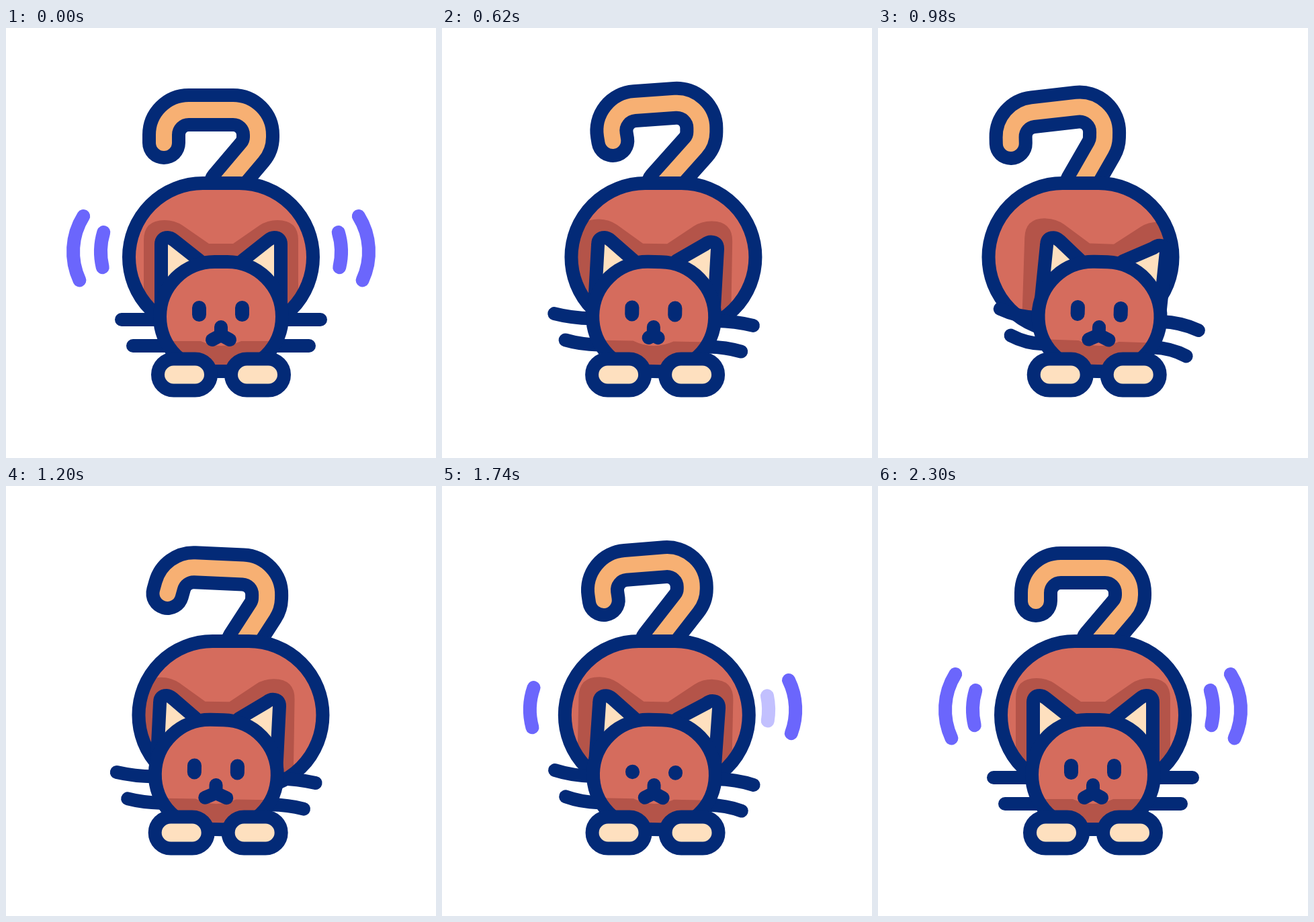
An HTML page with a canvas for the animation above (2.5 s loop, 640 px wide and 640 px high).

```html
<!DOCTYPE html>
<html lang="en">
<head>
<meta charset="utf-8">
<title>Wiggling cat</title>
<style>
  html, body { margin: 0; height: 100%; overflow: hidden; background: #fff; }
  canvas { display: block; width: 100vw; height: 100vh; }
</style>
</head>
<body>
<canvas id="stage" width="640" height="640"></canvas>
<script>
const ctx = document.getElementById('stage').getContext('2d');
const NAVY = '#032a77', RED = '#d56c5d', SHADE = '#b45449',
      ORANGE = '#f7b073', CREAM = '#fee0bf', VIOLET = '#6b66fc';
const LOOP = 2500, START = 165, END = 2300;

const clamp = (v, lo = 0, hi = 1) => Math.min(hi, Math.max(lo, v));
const sinDeg = a => Math.sin(a * Math.PI / 180);

// Smooth curve through [time, value] keys, at rest at both ends.
function spline(keys, t) {
  const n = keys.length - 1;
  t = clamp(t, keys[0][0], keys[n][0]);
  let i = 0;
  while (i < n - 1 && t > keys[i + 1][0]) i++;
  const slope = k => k < 1 || k >= n ? 0
    : (keys[k + 1][1] - keys[k - 1][1]) / (keys[k + 1][0] - keys[k - 1][0]);
  const [t0, a] = keys[i], [t1, b] = keys[i + 1];
  const d = t1 - t0, u = (t - t0) / d, v = 1 - u;
  return v * v * (1 + 2 * u) * a + u * u * (3 - 2 * u) * b
       + d * u * v * (v * slope(i) - u * slope(i + 1));
}

// Swing phase in degrees; the head runs slightly ahead near the end.
const phase = late => [[START, 180], [340, 217], [620, 390], [980, 630],
                       [1440, 918], [1740, late], [END, 1260]];
const BODY_PHASE = phase(1079), HEAD_PHASE = phase(1105);
const LEAN = [[START, 0], [340, 3], [480, 11], [620, 9], [800, -12], [980, 16],
              [1200, 8], [1440, -14], [1740, 11], [1980, -8], [END, 0]];
const MOUTH = [[START, 13], [340, 10.5], [620, 7], [980, 15], [1440, 15.5], [1740, 13.5], [END, 13]];

// Tail: tip, three bends and root, with offsets for each pose.
const TAIL = [235, 171, 235, 122, 375, 122, 375, 175, 326, 233];
const TAIL_POSES = [
  [START, Array(10).fill(0)],
  [340, [-3, 4, -5, 3, -5, -3, -3, -3, -1, 0]],
  [620, [8, -3, 0, -3, 0, -13, 0, -7, -9, 0]],
  [800, [-4, -19, 14, -16, 8, 10, 8, 5, 10, 0]],
  [980, [-15, 1, -16, 7, -15, -9, -16, -3, -2, 0]],
  [1440, [-5, -24, 18, -14, 11, 17, 10, 7, 18, 0]],
  [1740, [6, -1, -1, -1, -3, -12, -3, -10, -7, 0]],
  [1980, [-2, -14, 9, -12, 5, 2, 4, 3, 7, 0]],
  [END, Array(10).fill(0)]
];

const box = (x, y, w, h, r) => {
  const p = new Path2D();
  p.roundRect(x, y, w, h, r);
  return p;
};
const BODY = box(183, 231, 274, 220, 110);
const HEAD = box(229, 348, 182, 163, 81.5);
const PAW = box(226, 492.5, 79, 47, 23.5);
const HEAD_SHADOW = new Path2D('M205 445V316Q205 286 236 286Q251 286 263 294L302 321H338' +
  'L377 294Q389 286 404 286Q435 286 435 316V445Z');
const CHIN_SHADOW = new Path2D('M220 466H290Q320 480 350 466H420V520H220Z');

function stroke(path, width = 20, color = NAVY) {
  ctx.lineWidth = width;
  ctx.strokeStyle = color;
  ctx.stroke(path);
}
function fill(path, color) {
  ctx.fillStyle = color;
  ctx.fill(path);
}
function group(draw) {
  ctx.save();
  draw();
  ctx.restore();
}
// Draws once as is (side 1) and once mirrored (side -1).
function bothSides(draw) {
  for (const side of [1, -1]) group(() => {
    if (side < 0) { ctx.translate(640, 0); ctx.scale(-1, 1); }
    draw(side);
  });
}

function wave(x, half, alpha) {
  const p = new Path2D(), angle = h => Math.asin(h / 100);
  p.arc(x + 100, 333, 100, Math.PI - angle(half * .8), Math.PI + angle(half));
  ctx.globalAlpha = clamp(alpha);
  stroke(p, 20, VIOLET);
  ctx.globalAlpha = 1;
}

function waves(t, side) {
  const rings = [
    { rest: 100, half: 53, travel: 36, grow: .22, delay: 0 },
    { rest: 141, half: 29, travel: 45, grow: .4, delay: 117 }
  ];
  for (const { rest, half, travel, grow, delay } of rings) {
    if (t < 800) {
      const out = travel * Math.max(0, t - START) / 175, x = rest - out;
      if (x > 62) wave(x, half + grow * out, (x - 62) / 18);
    } else {
      const u = clamp((t - 1564 - delay - (side > 0 ? 81 : 0)) / 340);
      const inset = (160 - rest) * (1 - u) ** 2;
      if (u > 0) wave(rest + inset, half - .65 * inset, (160 - rest - inset) / 15);
    }
  }
}

function tail(t, shift) {
  const q = TAIL.map((v, i) =>
    v + spline(TAIL_POSES.map(([time, pose]) => [time, pose[i]]), t) + (i % 2 ? 0 : 1.2 * shift));
  const p = new Path2D();
  p.moveTo(q[0], q[1]);
  p.arcTo(q[2], q[3], q[4], q[5], 37);
  p.arcTo(q[4], q[5], q[6], q[7], 37);
  p.arcTo(q[6], q[7], q[8], q[9], 35);
  p.lineTo(q[8], q[9]);
  stroke(p, 64);
  stroke(p, 24, ORANGE);
}

function earAndWhiskers(side, lean) {
  const tip = -side * .7 * lean;
  stroke(new Path2D(`M240 434H228Q198 434 172 ${434 + tip}M250 473H238Q212 473 189 ${473 + tip}`));
  const dx = side * .45 * lean, dy = Math.abs(lean) * (dx < 0 ? .55 : .16);
  const at = (x, y) => `${x + dx} ${y + dy} `;
  const ear = new Path2D(`M231 430L${at(231, 322)}Q${at(231, 312)}${at(241, 312)}` +
    `Q${at(245, 312)}${at(250, 316)}L288 346`);
  fill(ear, CREAM);
  stroke(ear);
}

function face(t) {
  fill(HEAD, RED);
  group(() => { ctx.clip(HEAD); fill(CHIN_SHADOW, SHADE); });
  stroke(HEAD);
  const blink = Math.max(...[340, 1740].map(m => clamp(1.2 - Math.abs(t - m) / 100)));
  const top = 416.5 + 9.4 * blink;
  stroke(new Path2D(`M287.5 ${top}V426.5M351.5 ${top}V426.5`), 21);
  const m = spline(MOUTH, t), y = 464 - Math.max(0, 13 - m) * .5;
  stroke(new Path2D(`M320 445V457L${320 - m} ${y}M320 457L${320 + m} ${y}`));
}

function draw(t) {
  const shift = 18.5 * sinDeg(spline(BODY_PHASE, t));
  const swing = -sinDeg(spline(HEAD_PHASE, t));
  const lean = spline(LEAN, t);
  const toHead = () => {
    ctx.translate(320 + 9.5 * swing, 430);
    ctx.rotate(.002 * lean);
    ctx.translate(-320, -430);
  };

  ctx.fillStyle = '#fff';
  ctx.fillRect(0, 0, 640, 640);
  ctx.lineCap = ctx.lineJoin = 'round';

  bothSides(side => waves(t, side));
  tail(t, shift);
  group(() => {
    ctx.translate(shift, 0);
    fill(BODY, RED);
    ctx.clip(BODY);
    ctx.translate(-shift, 0);
    toHead();
    fill(HEAD_SHADOW, SHADE);
  });
  group(() => { ctx.translate(shift, 0); stroke(BODY); });
  group(() => {
    toHead();
    bothSides(side => earAndWhiskers(side, lean));
    face(t);
  });
  group(() => {
    ctx.translate(5.7 * swing, 0);
    bothSides(() => { fill(PAW, CREAM); stroke(PAW); });
  });
}

function tick() {
  draw(performance.now() % LOOP);
  requestAnimationFrame(tick);
}
tick();
</script>
</body>
</html>
```
